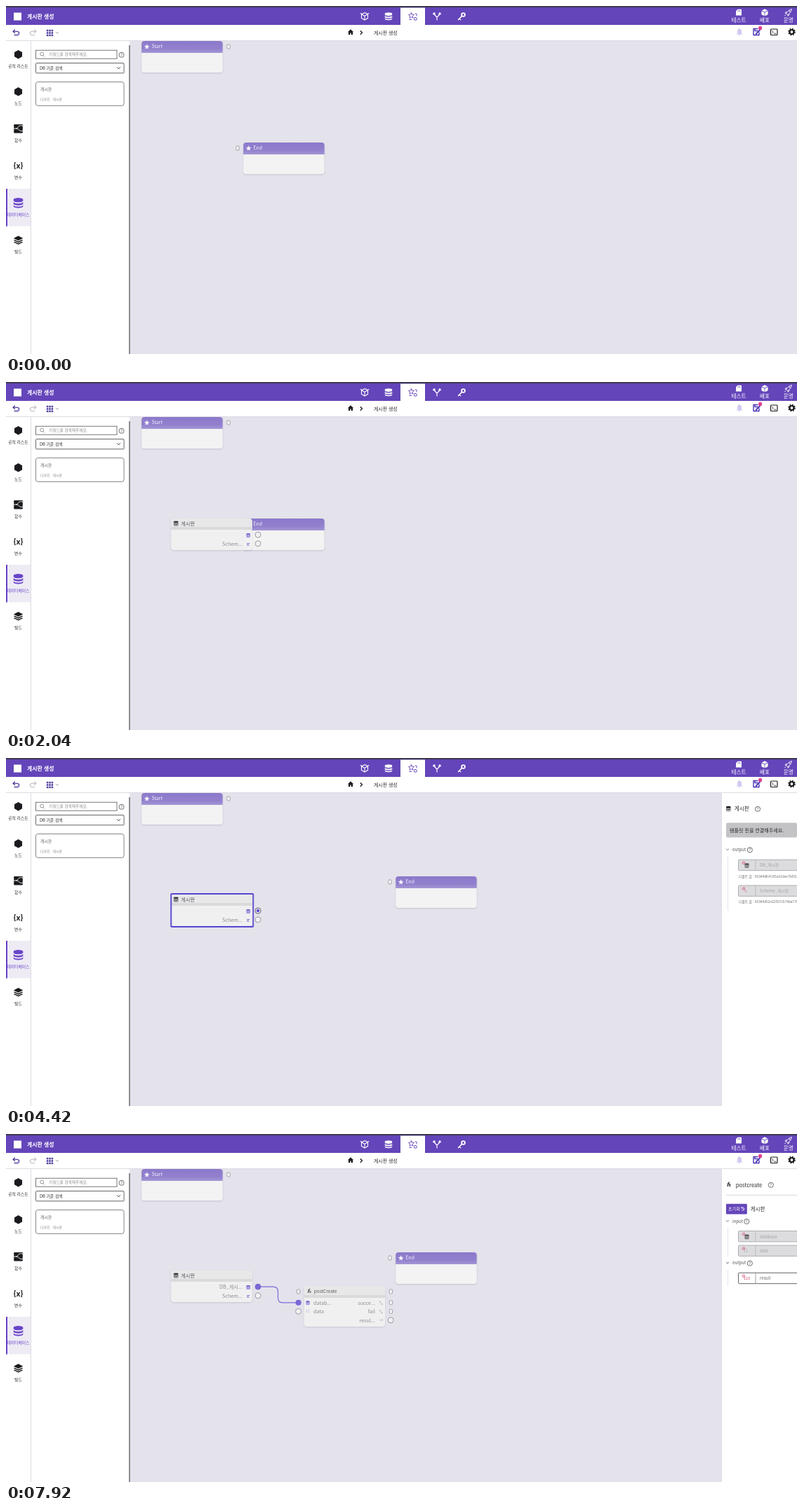
Animation of 1127 by 497 pixels, one loop 7990 ms. Source, as an HTML page:

```html
<!DOCTYPE html>
<html lang="ko">
<head>
<meta charset="utf-8">
<title>Logic editor</title>
<style>
html,body{margin:0;width:100%;height:100%;overflow:hidden;background:#e4e3ec}
svg{display:block;width:100%;height:100%}
text{font-family:"Noto Sans CJK KR","Noto Sans CJK",sans-serif;white-space:pre}
.shade{filter:drop-shadow(0 1px 1px rgba(60,50,90,.18))}
.lift{filter:drop-shadow(0 0 3px rgba(40,30,80,.35))}
.float{filter:drop-shadow(0 0 5px rgba(30,30,40,.4))}
</style>
</head>
<body>
<svg id="stage" viewBox="0 0 1127 497">
<defs>
<linearGradient id="bar" x1="0" y1="0" x2="0" y2="1"><stop offset="0" stop-color="#8c79ca"/><stop offset=".65" stop-color="#9280cd"/><stop offset="1" stop-color="#a497d6"/></linearGradient>
</defs>
</svg>
<script>
const T = 7990, PURPLE = '#6445ba', INDIGO = '#5646cf', INK = '#1b1b1f', GREY = '#8a8a8e';

// Drawing helpers; text is placed by its vertical centre.
const rect = (x, y, w, h, fill, more = '') => `<rect x="${x}" y="${y}" width="${w}" height="${h}" fill="${fill}" ${more}/>`;
const box = (x, y, w, h, fill, stroke, r = 0, sw = 1) => rect(x, y, w, h, fill, `stroke="${stroke}" stroke-width="${sw}" rx="${r}"`);
const text = (x, y, size, fill, str, weight = 400, anchor = 'start') =>
  `<text x="${x}" y="${y + size * .36}" font-size="${size}" fill="${fill}" font-weight="${weight}" text-anchor="${anchor}">${str}</text>`;
const line = (d, stroke, sw = 1) => `<path d="${d}" fill="none" stroke="${stroke}" stroke-width="${sw}" stroke-linejoin="round" stroke-linecap="round"/>`;
const dot = (x, y, r, fill, stroke = 'none', sw = 1) => `<circle cx="${x}" cy="${y}" r="${r}" fill="${fill}" stroke="${stroke}" stroke-width="${sw}"/>`;
const group = (id, body, cls = '') => `<g id="${id}" class="${cls}">${body}</g>`;
const at = (x, y, body) => `<g transform="translate(${x} ${y})">${body}</g>`;

const SHAPES = {
  star: 'M12 1l3.2 7.6 8 .7-6 5.4 1.8 8L12 18.4 5 22.7l1.8-8-6-5.4 8-.7z',
  home: 'M1 12 12 1l11 11h-3v10h-6v-7h-4v7H4V12z',
  hex: 'M12 0l10.5 6v12L12 24 1.5 18V6z',
  layers: 'M12 1l12 6-12 6L0 7zM0 12l3-1.5 9 4.5 9-4.5 3 1.5-12 6zM0 17l3-1.5 9 4.5 9-4.5 3 1.5-12 6z',
  db: 'M1 4.5a11 4 0 0 1 22 0v2a11 4 0 0 1-22 0zM1 9.500a11 4 0 0 0 22 0v4a11 4 0 0 1-22 0zM1 16.500a11 4 0 0 0 22 0v3a11 4 0 0 1-22 0z',
  warn: 'M12 1l12 21H0zM10.8 8v7h2.4V8zM10.8 17v2.400h2.400v-2.400z',
  cube: 'M12 0l10 5-10 5L2 5zM1 7l10 5v12L1 19zM23 7l-10 5v12l10-5z',
  card: 'M8 1h14v22H2V7zM8 5v4h2V5zM12 5v4h2V5zM16 5v4h2V5z',
  bell: 'M12 0a2 2 0 0 1 2 2 7 7 0 0 1 5 7v7l3 4H2l3-4V9a7 7 0 0 1 5-7 2 2 0 0 1 2-2zM9 21h6a3 3 0 0 1-6 0z'
};
const icon = (name, x, y, size, fill) =>
  `<path d="${SHAPES[name]}" fill="${fill}" fill-rule="evenodd" transform="translate(${x - size / 2} ${y - size / 2}) scale(${size / 24})"/>`;
const help = (x, y) => dot(x, y, 3.6, 'none', '#333', .7) + text(x, y, 5.6, '#333', '?', 500, 'middle');
const chevron = (x, y, color = '#555', s = 1.8, sw = .8) => line(`M${x - s} ${y - s / 2}l${s} ${s}l${s} ${-s}`, color, sw);
const next = (x, y, s = 2, color = INK, sw = 1.2) => line(`M${x - s / 2} ${y - s}l${s} ${s}l${-s} ${s}`, color, sw);
const lens = (x, y) => dot(x - .4, y - .6, 2.4, 'none', '#666', .7) + line(`M${x + 1.4} ${y + 1.2}l1.8 1.8`, '#666', .7);
const search = (x, y, w) => box(x, y, w, 12, '#fff', '#66666a', 0, .9) + lens(x + 9, y + 6) +
  text(x + 18.5, y + 6, 5.67, '#8d8d92', '키워드를 검색해주세요.');
const flowPin = (x, y) => box(x - 2.2, y - 3, 4.4, 6, '#f4f4f6', '#8f8f96', 1.2, .8);
const dataPin = (x, y) => dot(x, y, 4, '#f1f1f4', '#8f8f96', .9);
const livePin = (x, y) => dot(x, y, 4.1, '#7a68d6');

// Node bodies
const eventNode = name => group('', rect(0, 0, 115.5, 45, '#f3f3f3', 'rx="4"') +
  '<path d="M0 17V4a4 4 0 0 1 4-4h107.500a4 4 0 0 1 4 4v13z" fill="url(#bar)"/>' +
  icon('star', 7.5, 8, 8, '#f4f1fb') + text(14.2, 8, 6.9, '#f4f1fb', name), 'shade');
const plainNode = (w, h, head) => group('', rect(0, 0, w, h, '#f3f3f3', 'rx="4" opacity=".94"') +
  `<path d="M0 ${head}V4a4 4 0 0 1 4-4h${w - 8}a4 4 0 0 1 4 4v${head - 4}z" fill="#e7e7e8" opacity=".9"/>` +
  rect(0, head, w, 4, '#dadadd'), 'shade');
const outline = box(0, -1, 117, 47, 'none', INDIGO, 1, 1.8);
const schemaIcon = (x, y) => rect(x - 2, y - 1.8, 4, 1, '#7a68d6') + rect(x - 2, y - .3, 2.6, .9, '#7a68d6') + rect(x - 2, y + 1, 3.4, .9, '#a99be4');

const canvas = () => rect(177, 50, 950, 447, '#e4e3ec') +
  at(193.2, 50, eventNode('Start')) + flowPin(317, 58) +
  group('end', at(338.2, 195, flowPin(-8.2, 8) + eventNode('End') + group('endPick', outline))) +
  group('wire', line('M359 218.200H380Q387.500 218.200 387.500 225V234Q387.500 240.800 394 240.800H416', '#7d6cdc', 1.2)) +
  group('source', at(235.2, 195, plainNode(115.5, 45, 12) +
    icon('db', 7, 7, 7.5, '#3a3a3e') + text(14, 7, 7.2, '#55555a', '게시판', 500) +
    group('alert', icon('warn', 109.5, 7, 8, '#eda892') + text(101.8, 23.8, 7.2, '#eda08e', 'DB_게시...', 500, 'end')) +
    group('linked', text(101.8, 23.8, 7.2, '#8d8d91', 'DB_게시...', 400, 'end')) +
    icon('db', 110, 24, 6.5, '#7160d2') + text(101.8, 36.5, 7.2, '#8d8d91', 'Schem...', 400, 'end') + schemaIcon(110, 37) +
    group('sourcePick', outline)) +
    dataPin(359, 218.2) + dataPin(359, 230.8) +
    group('pinHover', dot(359, 218.2, 4, '#f1f1f4', '#55555f', .9) + dot(359, 218.2, 2.1, INDIGO)) +
    group('pinLive', livePin(359, 218.2))) +
  group('create', at(424.6, 217, plainNode(115.5, 58, 13) +
    text(4.500, 7, 7.5, '#44444a', '<tspan font-style="italic">f</tspan><tspan font-size="5">x</tspan>', 700) +
    text(14.2, 7.3, 6.5, '#5b5b60', 'postCreate', 500) +
    icon('db', 5.4, 24.2, 6, '#7160d2') + text(13.5, 24.2, 7.2, '#8d8d91', 'datab...') +
    text(5.4, 36.5, 5, '#8a7bd8', '{ }', 500, 'middle') + text(13.5, 36.8, 7.2, '#8d8d91', 'data') +
    ['succe...', 'fail', 'resul...'].map((s, i) => text(101.4, 24.2 + 12.5 * i, 7.2, '#8d8d91', s, 400, 'end')).join('') +
    [24.2, 36.7].map(y => line(`M107.500 ${y - 1.8}h2M108 ${y - 1}l3.500 3M110 ${y + 2}h2`, '#a9a9ae', .7)).join('') +
    text(110, 49.2, 3.4, '#99999e', '123', 500, 'middle')) +
    flowPin(416.6, 225) + livePin(416.6, 240.8) + dataPin(416.6, 253.3) +
    flowPin(548.4, 225) + flowPin(548.4, 240.8) + flowPin(548.4, 253.3) + dataPin(548.2, 265.8));

// Application chrome
const header = () => rect(0, 0, 1127, 27, PURPLE) + rect(0, 0, 1127, 2, '#403a50') +
  rect(11, 9.5, 11, 11, '#fff') + text(30, 15, 7.9, '#fff', '게시판 생성', 700) +
  rect(562, 2.5, 35, 24.5, '#fff') +
  line('M511 9.500l4.500 2.300v5.700l-4.500 2.500-4.500-2.500v-5.700zM506.500 11.800l4.500 2.400 4.500-2.400M511 14.200v5.500M505 10.500l2.500 1M517 10.500l-2.500 1', '#fff', 1.1) +
  icon('db', 545, 14.7, 11.5, '#fff') +
  line('M577.500 9.500l1.200 2.600 2.800.3-2.100 1.900.6 2.800-2.500-1.400-2.500 1.400.6-2.800-2.100-1.900 2.800-.3zM583 11h2v3M575 18.500v1h3', PURPLE, .9) +
  box(581.5, 16.5, 3.6, 3.6, '#fff', PURPLE, 1, 1) +
  line('M614 20v-4l-4-4v-2M614 16l4-4v-2M608.500 11.500l1.500-2 1.500 2M616.500 11.500l1.500-2 1.500 2', '#fff', 1.2) +
  dot(651.5, 12.5, 2.4, 'none', '#fff', 1.8) + line('M649.500 14.500l-5 5M646 18l1.500 1.500', '#fff', 1.6) +
  icon('card', 1044, 9.2, 9.5, '#fff') + icon('cube', 1081, 9.3, 10, '#fff') +
  line('M1112 10.500q2-5 7.500-6q-.5 5-5.500 8zM1112 10l-2 .5 1.500-2.500M1114.500 12l-.5 2.500 2.500-2.500M1111 12.500l-1.500 1.500', '#fff', .9) + dot(1116.4, 7.6, .9, '#fff') +
  [[1044, '테스트'], [1081, '배포'], [1114.7, '운영']].map(([x, s]) => text(x, 20, 7.6, '#fff', s, 500, 'middle')).join('');

const toolbar = () => rect(0, 27, 1127, 22.5, '#fff') + rect(0, 49, 1127, 1, '#dddbe4') +
  line('M12.500 34l-2.500 2.300 2.500 2.300M10.500 36.300h5.500a2.600 2.600 0 0 1 0 5.200h-4', '#51419f', 1.3) +
  line('M40.500 34l2.500 2.300-2.500 2.300M42.500 36.300h-5.500a2.600 2.600 0 0 0 0 5.200h4', '#c3c3c8', 1.2) +
  Array.from({length: 9}, (_, i) => rect(57.8 + i % 3 * 3.4, 33.8 + (i / 3 | 0) * 3.4, 2.5, 2.5, '#51419f')).join('') +
  chevron(73, 38.3, '#888') + icon('home', 491, 37.3, 9, INK) + next(506.3, 38, 2.3, INK, 1.4) +
  text(524, 38.3, 6.9, '#2b2b30', '게시판 생성') +
  icon('bell', 1045, 37, 10.5, '#d3caf1') +
  line('M1073 38v3.500h-8v-9h6M1067 33v2.500h4', '#4c35b5', 1.4) + line('M1068.500 40l5.500-5.500', '#4c35b5', 1.8) + dot(1074.6, 31.4, 2.6, '#e43b8d') +
  box(1089.5, 33, 9.5, 8.5, '#fff', INK, 1, 1.2) + line('M1091.500 35.500l1.800 1.800-1.800 1.800M1094.500 39.300h2.500', INK, .9) +
  dot(1119.5, 37, 3, 'none', INK, 2.2) +
  '<circle cx="1119.500" cy="37" r="4.500" fill="none" stroke="#1b1b1f" stroke-width="1.600" stroke-dasharray="1.900 1.634"/>';

const sidebar = () => rect(0, 50, 35.5, 447, '#fff') + rect(35, 50, 1, 447, '#dcdce2') +
  rect(0, 261, 35, 53.5, '#eeebf5') + rect(0, 261, 2, 53.5, '#6a45c8') +
  icon('hex', 17.5, 69.2, 12.6, INK) + icon('hex', 17.5, 122.3, 12.6, INK) +
  rect(11.2, 169, 12.6, 12.6, INK, 'rx="1"') + line('M11.500 175h3q2 0 3-2.500t6-1.500M14.500 175q3 0 4 2t5 1.500', '#fff', .9) +
  text(17.5, 228, 10.5, INK, '{x}', 700, 'middle') +
  icon('db', 17.5, 281.3, 15, '#6a45c8') + icon('layers', 17.5, 334.5, 13.5, INK) +
  ['로직 리스트', '노드', '함수', '변수', '데이터베이스', '빌드'].map((s, i) =>
    text(17.4, 86 + 53 * i, 5.8, i === 4 ? '#6a45c8' : '#2b2b30', s, 500, 'middle')).join('');

const itemCard = (stroke, c1, c2, fill = '#fff', sw = .9) => box(42.5, 108.4, 125.6, 34, fill, stroke, 3, sw) +
  text(49, 118.5, 5.8, c1, '게시판') + text(49, 133, 4.85, c2, '디자인 : 게시판');

const library = () => rect(36, 50, 140, 447, '#fff') + rect(175, 56, 2, 441, '#8c8c91') +
  search(42.5, 63.2, 115.5) + help(164.6, 69.8) +
  box(42.5, 81.5, 125.6, 14.3, '#fff', '#55555a', 1, .9) + text(48, 88.8, 5.85, '#2b2b30', 'DB 기준 검색') + chevron(160.5, 88.7, '#333', 2.2, 1) +
  itemCard('#77777c', '#626267', GREY) +
  group('picked', itemCard('#4c3aa6', '#4c3aa6', '#4c3aa6', '#fff', 1.1), 'lift');

const ghost = () => group('ghost', `<g opacity=".86">${itemCard('#7563c6', '#5b48b5', '#4c3aa6', '#fff', 1.1)}</g>`, 'float');

// Finder popup
const FUNCTIONS = ['delete', 'getFind', 'getFindAdv', 'getFindCount', 'postCreate', 'postCreateBulkCSV',
  'postCreateBulkJSON', 'postCreateBulkXML', 'postCreateMany', 'putUpdate'];
const folder = color => text(430.8, 317.5, 5.8, color, 'db') + next(445, 317.5, 1.6, color, .8);
const finder = () => group('finder',
  group('', box(411.7, 267.7, 133.3, 184, '#fff', '#c4c3ca', 3, .8), 'lift') +
  search(421.6, 278.4, 103) + help(531, 285) +
  group('root', icon('home', 425.2, 301.3, 8, '#77777c')) +
  group('folder', folder('#66666b')) + group('folderHover', folder('#5b48c5')) +
  group('list', icon('home', 425.2, 301.3, 8.6, INK) + next(435.8, 301.3, 1.9, INK, 1) + text(443.5, 301.7, 6.6, '#55555a', 'db') +
    rect(533, 296, 2, 121, '#8c8c91') +
    FUNCTIONS.map((s, i) => text(430.8, 317.6 + 13.32 * i, 5.8, '#66666b', s)).join('')));

// Inspector panels
const rule = rect(1026, 86.8, 101, .9, '#d2d2d7');
const section = (x, y, name, mark) => chevron(x, y - .2) + text(x + 7, y, 6, '#55555a', name) + help(mark, y + .3);
const field = (y, name, glyph, off = true) => box(1043.5, y, 90, 15.4, off ? '#dcdcde' : '#fff', off ? '#a9a9ae' : '#55555a', 1, .9) +
  rect(1067.6, y, .8, 15.4, off ? '#b5b5ba' : '#88888d') + glyph(1055.5, y + 8) +
  dot(1051, y + 4.5, 1.9, 'none', '#de6b92', .9) + line(`M1050 ${y + 4.5}h2`, '#de6b92', .7) +
  text(1074, y + 8, 5.8, off ? '#a2a2a7' : '#66666b', name);
const dbGlyph = (x, y) => icon('db', x, y + .3, 7, '#55555a');
const glyph = (str, color, size) => (x, y) => text(x - 1.5, y, size, color, str, 500, 'middle');
const outputs = shift => at(0, shift, section(1028, 131, 'output', 1059.8) + rect(1028, 141, .7, 77, '#dcdce0') +
  field(145.3, 'DB_게시판', dbGlyph) + text(1043.8, 169, 4.8, '#66666b', '디폴트 값 : 66344dfc4165a61dee7bf31a') +
  field(182, 'Scheme_게시판', glyph('%', '#c9899f', 5)) + text(1043.8, 205.3, 4.8, '#66666b', '디폴트 값 : 66344d52e32597c574da7704'));

const inspector = () => group('inspector', rect(1019.5, 50, 108, 447, '#fff') + rect(1019, 50, .8, 447, '#d9d8e2') +
  group('endInfo', rule + icon('star', 1029.5, 72.5, 8.5, INK) + text(1038.8, 72.8, 7.6, '#2b2b30', 'end') + help(1064.5, 72.8) +
    section(1028, 99.8, 'input', 1055.3) + rect(1028, 109, .7, 27, '#dcdce0') +
    section(1045, 114.5, '반환값', 1074.2) + rect(1045.3, 124, .7, 12, '#dcdce0') +
    text(1060.6, 130.6, 5.75, '#2b2b30', '빈 리스트가 없습니다')) +
  group('dbInfo', icon('db', 1029.3, 72.3, 7.4, INK) + text(1037.8, 72.3, 7.6, '#2b2b30', '게시판') + help(1071, 72.8) +
    group('notice', rect(1026, 92.6, 101, 21, '#c3c3c5', 'rx="2"') + text(1031, 103.4, 7.05, '#2b2b30', '템플릿 핀을 연결해주세요.', 500) + outputs(0)) +
    group('settled', outputs(-31))) +
  group('createInfo', rule + text(1026.4, 72.4, 8, INK, '<tspan font-style="italic">f</tspan><tspan font-size="6">x</tspan>', 700) +
    text(1039.8, 72.8, 7.6, '#2b2b30', 'postcreate') + help(1089.8, 72.8) +
    rect(1026, 99.8, 29.8, 14.8, PURPLE, 'rx="1"') + text(1029, 107.2, 6.1, '#fff', '초기화', 500) +
    line('M1048 105.500a2.300 2.300 0 1 1 .2 3.300M1047.700 104v1.700h1.700M1050 106v1.500h1', '#fff', .7) +
    text(1060.6, 107.2, 7.6, '#2b2b30', '게시판', 500) +
    section(1028, 124.6, 'input', 1055.3) + rect(1028, 134, .7, 41, '#dcdce0') +
    field(138.5, 'database', dbGlyph) + field(159, 'data', glyph('{ }', '#99999e', 6)) +
    section(1028, 184.3, 'output', 1059.8) + rect(1028, 194, .7, 23, '#dcdce0') +
    field(198.3, 'result', glyph('  123', '#c23a62', 5.4), false)));

const stage = document.getElementById('stage');
stage.insertAdjacentHTML('beforeend', canvas() + header() + toolbar() + sidebar() + library() + inspector() + finder() + ghost());

// Timeline: every change is a hard step.
const play = (id, frames) => document.getElementById(id).animate(
  frames.map(f => ({...f, easing: 'step-end'})), {duration: T, iterations: Infinity});
const show = (id, ...spans) => play(id, [{offset: 0, opacity: 0},
  ...spans.flatMap(([a, b = T]) => [{offset: a / T, opacity: 1}, {offset: b / T, opacity: 0}]),
  {offset: 1, opacity: 0}]);
const move = (id, start, points) => {
  const pose = ([x, y], offset) => ({offset, transform: `translate(${x}px,${y}px)`});
  play(id, [pose([0, 0], 0), ...points.map((p, i) => pose(p, (start + 70 * i) / T)), pose(points.at(-1), 1)]);
};

show('picked', [500, 1620]);
show('ghost', [780, 1620]);
move('ghost', 780, [[18, 16], [55, 52], [91, 82.3], [104, 84], [112, 84], [117, 83], [121, 82], [124, 81], [127, 80], [129, 79.5], [131, 79], [132, 79]]);
show('source', [1620]);
show('endPick', [2390, 4210]);
move('end', 2390, [.02, .28, .64, .92, 1].map(p => [217 * p, -26 * p]));
show('inspector', [2390, 4210], [4420]);
show('endInfo', [2390, 4210]);
show('dbInfo', [4420, 7920]);
show('sourcePick', [4420, 7920]);
show('pinHover', [4420, 5330]);
show('finder', [5330, 7360]);
show('root', [5330, 6030]);
show('folder', [5330, 5680]);
show('folderHover', [5680, 6030]);
show('list', [6030, 7360]);
show('alert', [0, 7360]);
show('notice', [4420, 7360]);
['linked', 'pinLive', 'wire', 'create', 'settled'].forEach(id => show(id, [7360]));
show('createInfo', [7920]);
</script>
</body>
</html>
```
